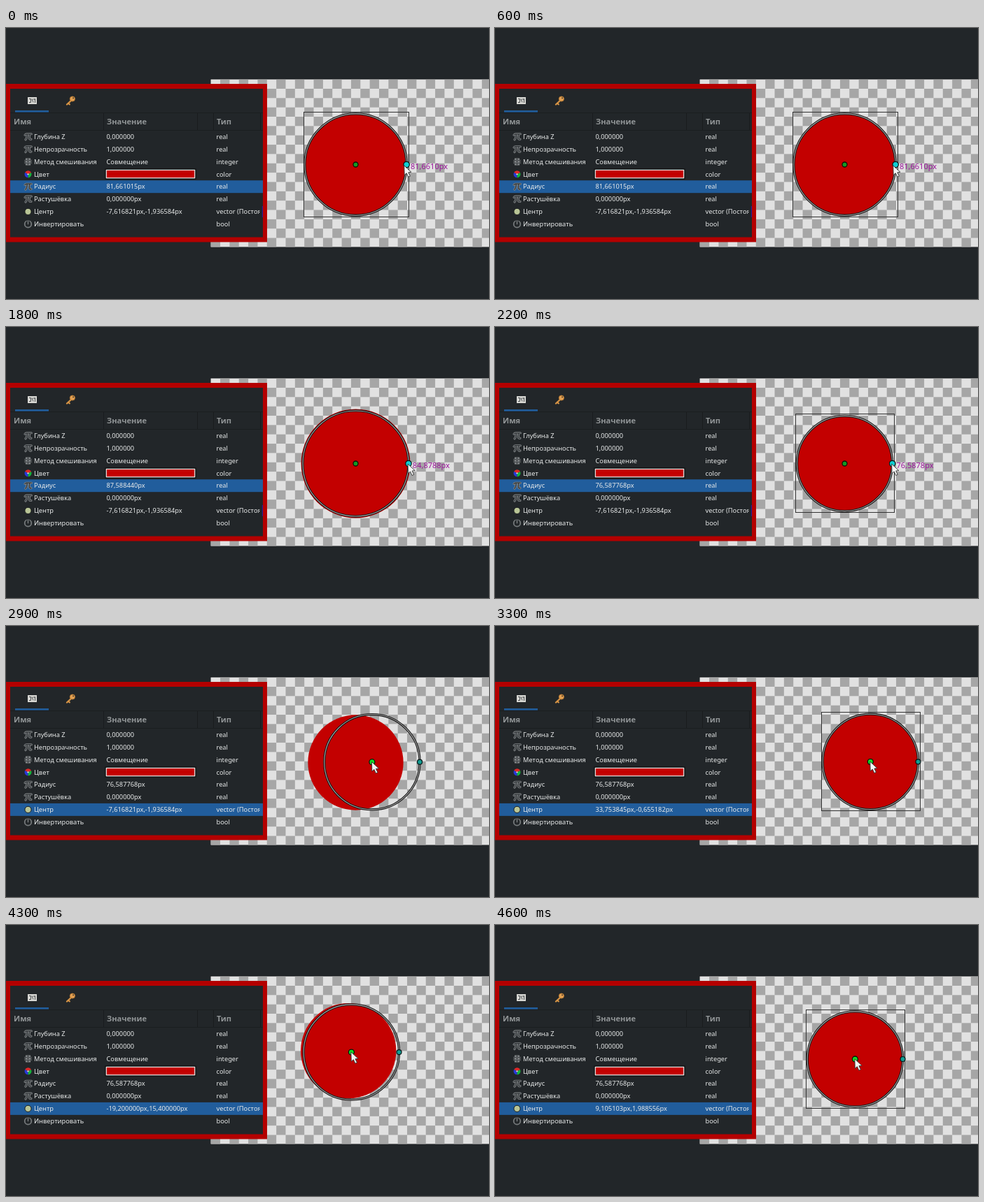
These frames come from a looping animation (690 px wide and 388 px high, 5 s). An HTML page with a canvas:

```html
<!DOCTYPE html>
<html lang="ru">
<head>
<meta charset="utf-8">
<style>
html, body { margin: 0; width: 100%; height: 100%; overflow: hidden; background: #222629; }
canvas { display: block; width: 690px; height: 388px; }
</style>
</head>
<body>
<canvas id="stage"></canvas>
<script>
const W = 690, H = 388, LOOP = 5000, STEP = 100;
const SCALE = 0.89, ORIGIN = { x: 506.28, y: 193.78 };
const FONT = '"Noto Sans", sans-serif';
const RED = '#c30000', BLUE = '#215d9c', BG = '#222629';

const canvas = document.getElementById('stage');
const ctx = canvas.getContext('2d');
const dpr = window.devicePixelRatio || 1;
canvas.width = W * dpr;
canvas.height = H * dpr;

// Each key: time, then values in document pixels.
const radiusKeys = [
  [600, 81.661015], [700, 82.3], [800, 84.2], [900, 86.1371], [1000, 87.3], [1100, 87.58844],
  [1700, 87.58844], [1800, 84.8788], [1900, 81.6], [2000, 78.6], [2100, 76.9], [2200, 76.587768]
];
const centerKeys = [
  [2700, -7.616821, -1.936584], [2800, 0.5, -1.6], [2900, 18.7, -1.03],
  [3000, 29.5, -0.72], [3200, 33.753845, -0.655182],
  [3400, 33.753845, -0.655182], [3500, 28.5, 2.2], [3600, 10, 8.4], [3700, -12.1, 14.3],
  [3800, -19.2, 15.4], [4200, -19.2, 15.4], [4300, -14.5, 13.2], [4400, -4, 8.1],
  [4500, 6.5, 3.2], [4600, 9.105103, 1.988556]
];
const radiusDrags = [[700, 1200], [1800, 2200]];
const centerDrags = [[2800, 3300], [3500, 3900], [4300, 4600]];

function sample(keys, t) {
  if (t <= keys[0][0]) return keys[0].slice(1);
  for (let i = 1; i < keys.length; i++) {
    const a = keys[i - 1], b = keys[i];
    if (t <= b[0]) {
      const k = (t - a[0]) / (b[0] - a[0]);
      return a.slice(1).map((v, j) => v + (b[j + 1] - v) * k);
    }
  }
  return keys[keys.length - 1].slice(1);
}

const activeDrag = (drags, t) => drags.find(([from, to]) => t >= from && t < to);

// During a drag the layer keeps the values from before it.
function committed(keys, drags, t) {
  const drag = activeDrag(drags, t);
  return sample(keys, drag ? drag[0] - STEP : t);
}

const num = (v, digits) => v.toFixed(digits).replace('.', ',');
const toStage = ([x, y]) => ({ x: ORIGIN.x + x * SCALE, y: ORIGIN.y - y * SCALE });

function rect(x, y, w, h, color) {
  ctx.fillStyle = color;
  ctx.fillRect(x, y, w, h);
}

function text(str, x, y, size, color, weight = 400) {
  ctx.font = `${weight} ${size}px ${FONT}`;
  ctx.fillStyle = color;
  ctx.fillText(str, x, y);
}

function disc(x, y, r, fill, stroke, width = 1) {
  ctx.beginPath();
  ctx.arc(x, y, r, 0, Math.PI * 2);
  if (fill) { ctx.fillStyle = fill; ctx.fill(); }
  if (stroke) { ctx.strokeStyle = stroke; ctx.lineWidth = width; ctx.stroke(); }
}

function strokePath(d, color, width) {
  ctx.strokeStyle = color;
  ctx.lineWidth = width;
  ctx.stroke(new Path2D(d));
}

function at(x, y, draw) {
  ctx.save();
  ctx.translate(x, y);
  draw();
  ctx.restore();
}

const icons = {
  real() {
    const d = 'M-4.5 -2.6Q-3.6 -4 -2 -4H4.8M-1.4 -3.6Q-1.5 2 -3.6 4M2 -3.6V2.2Q2.2 4 4.5 3.4';
    ctx.lineCap = 'round';
    strokePath(d, '#85898b', 3);
    strokePath(d, '#303437', 1.3);
  },
  integer() {
    for (let i = 0; i < 3; i++) {
      rect(-3.5, -5 + i * 3.6, 7, 2.8, '#85898b');
      rect(-1.5, -4.2 + i * 3.6, 3, 1.1, '#3a3e41');
    }
    rect(-5, -3, 1, 6, '#6a6e70');
    rect(4, -3, 1, 6, '#6a6e70');
  },
  color() {
    ['#14b43c', '#2838d8', '#e02828'].forEach((color, i) => {
      const start = -0.5 + i * Math.PI * 2 / 3;
      ctx.beginPath();
      ctx.moveTo(0, 0);
      ctx.arc(0, 0, 5, start, start + Math.PI * 2 / 3);
      ctx.fillStyle = color;
      ctx.fill();
    });
    disc(0, 0, 1.2, '#c8d0d0');
  },
  vector() { disc(0, 0, 4.6, '#b9c596', '#15181a', 1); },
  bool() {
    disc(0, 0, 4.8, null, '#75797b', 1.8);
    rect(-1.8, -6, 3.6, 6, BG);
    rect(-0.8, -5.5, 1.6, 6, '#75797b');
  }
};

const rows = [
  ['Глубина Z', 'real', () => '0,000000'],
  ['Непрозрачность', 'real', () => '1,000000'],
  ['Метод смешивания', 'integer', () => 'Совмещение'],
  ['Цвет', 'color', null],
  ['Радиус', 'real', s => num(s.radius, 6) + 'px'],
  ['Растушёвка', 'real', () => '0,000000px'],
  ['Центр', 'vector', s => s.center.map(v => num(v, 6) + 'px').join(',')],
  ['Инвертировать', 'bool', () => '']
];

function drawTabs() {
  rect(13, 118, 48, 2.6, BLUE);
  rect(31, 99, 13, 10, '#d8d8d4');
  strokePath('M33 101.5H35.5V106.5H33M37 101.5L39 106.5M41.5 101V107M38.5 102H42', '#45484a', 1);
  at(92.5, 103.5, () => {
    ctx.lineCap = 'round';
    strokePath('M0.5 0.5L-5.5 6M-3.5 4L-1.8 5.8', '#d99545', 2.3);
    disc(2.4, -2, 3.6, '#e2a052', '#b87932', 0.8);
    disc(3.6, -3.2, 1, '#4c3b28');
  });
}

function drawPanel(s) {
  rect(0, 80, 373, 226.5, '#b40000');
  rect(6, 87, 361, 212.5, BG);
  drawTabs();

  rect(6, 121, 361, 1, '#1b1e20');
  rect(6, 146, 361, 1, '#1b1e20');
  for (const x of [139, 273, 296, 363]) rect(x, 122, 1, 24, '#191c1e');
  [['Имя', 11], ['Значение', 144], ['Тип', 301]].forEach(([label, x]) =>
    text(label, x, 137.5, 11.1, '#919597', 700));

  rows.forEach(([name, type, value], i) => {
    const y = 155.8 + i * 17.85;
    if (i === s.selected) rect(6, y - 9, 361, 18, BLUE);
    at(31.5, y, icons[type]);
    text(name, 40, y + 3.2, 9.25, '#e8eaea');
    if (value) {
      text(value(s), 143.5, y + 3.2, 9.25, '#e8eaea');
    } else {
      rect(141.5, y - 7.8, 130, 15, '#080808');
      rect(142.7, y - 6.6, 127.6, 12.6, '#f0f0f0');
      rect(143.9, y - 5.4, 125.2, 10.2, RED);
    }
    ctx.save();
    ctx.beginPath();
    ctx.rect(300, y - 9, 62.5, 18);
    ctx.clip();
    text(type === 'vector' ? 'vector (Постоянная)' : type, 300.5, y + 3.2, 9.25, '#e8eaea');
    ctx.restore();
    if (type === 'vector' && i !== s.selected) rect(365.8, y - 8, 1.2, 16, '#20209a');
  });
}

function drawBoard() {
  const x0 = 292.7, y0 = 73.6, cell = 15 * SCALE;
  rect(292, 72.6, W - 292, 241.4, '#101214');
  ctx.save();
  ctx.beginPath();
  ctx.rect(292.5, 73.5, W - 292, 240);
  ctx.clip();
  rect(292, 73, W - 292, 241, '#e1e1e1');
  for (let r = 0; r < 18; r++) {
    for (let c = (r + 1) % 2; c < 30; c += 2) {
      rect(x0 + c * cell, y0 + r * cell, cell, cell, '#a6a6a6');
    }
  }
  ctx.restore();
}

function drawCursor(x, y) {
  at(x, y, () => {
    const arrow = new Path2D('M0 0L0.4 13.6L3.5 10.9L6 16.4L8.6 15.2L6.1 9.9L10.2 9.5Z');
    ctx.lineJoin = 'round';
    ctx.fillStyle = '#f4f4f4';
    ctx.fill(arrow);
    ctx.strokeStyle = '#333';
    ctx.lineWidth = 0.9;
    ctx.stroke(arrow);
  });
}

function cursorPos(t, ring, handleX) {
  if (t < 700) return { x: handleX - 3.4, y: ring.y + 1.4 };
  const k = Math.min(1, Math.max(0, (t - 2300) / 300));
  return { x: handleX + (ring.x - handleX) * k - 1 + 0.5 * k, y: ring.y + 0.6 - 0.8 * k };
}

function draw(t) {
  const radius = sample(radiusKeys, t)[0];
  const ring = toStage(sample(centerKeys, t));
  const state = {
    radius: committed(radiusKeys, radiusDrags, t)[0],
    center: committed(centerKeys, centerDrags, t),
    selected: t < 2700 ? 4 : 6
  };
  const fill = toStage(state.center);
  const r = radius * SCALE, handleX = ring.x + r;
  const onRadius = t < 2400, onCenter = t >= 2600;
  const dragging = activeDrag(radiusDrags, t) || activeDrag(centerDrags, t);

  ctx.setTransform(dpr, 0, 0, dpr, 0, 0);
  rect(0, 0, W, H, BG);
  drawBoard();
  disc(fill.x, fill.y, state.radius * SCALE, RED);

  if (!dragging) {
    const half = r + 2.2;
    ctx.strokeStyle = '#333';
    ctx.lineWidth = 1;
    ctx.strokeRect(Math.round(ring.x - half) + 0.5, Math.round(ring.y - half) - 0.5,
      Math.round(half * 2), Math.round(half * 2));
  }
  disc(ring.x, ring.y, r, null, '#161616', 3.2);
  disc(ring.x, ring.y, r, null, '#a4a4a4', 1.1);

  disc(ring.x, ring.y, onCenter ? 4 : 3.5, onCenter ? '#12dc28' : '#159a22', '#0a120a', 1.3);
  disc(handleX, ring.y, onRadius ? 4.2 : 3.5, onRadius ? '#10cfd2' : '#129c92', '#071414', 1.2);
  if (onRadius) text(num(radius, 4) + 'px', handleX + 5.8, ring.y + 6.2, 11, '#9c149c');

  const cursor = cursorPos(t, ring, handleX);
  drawCursor(cursor.x, cursor.y);
  drawPanel(state);
}

const start = performance.now();
function tick() {
  const t = (performance.now() - start) % LOOP;
  draw(Math.floor(t / STEP) * STEP);
  requestAnimationFrame(tick);
}
tick();
</script>
</body>
</html>
```
